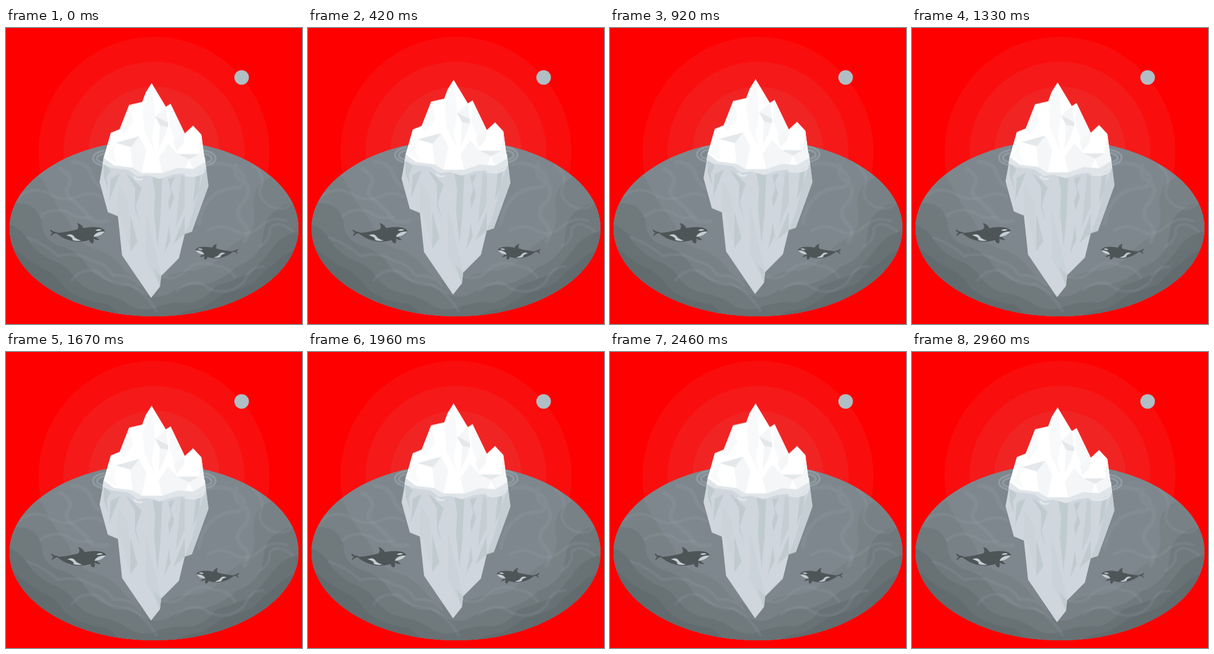
Write an HTML page that moves like this. It is 500 px wide and 500 px high and loops after 3 s.

```html
<!DOCTYPE html>
<html lang="en">
<head>
<meta charset="utf-8">
<title>Iceberg</title>
<style>
  html, body { margin: 0; width: 100%; height: 100%; overflow: hidden; background: #f00; }
  svg { display: block; width: 100vw; height: 100vh; }
  .berg { animation: float 1.5s linear -40ms infinite; }
  .whale { animation: shake 3s linear -40ms infinite; }
  .halo { fill: #b0bec5; opacity: .065; }
  .light { fill: none; stroke: #a9b4ba; stroke-linecap: round; stroke-linejoin: round; opacity: .13; }
  .ring { fill: none; stroke: #b4c0c7; opacity: .34; }
  .soft { fill: #f5f6f7; }
  .facet { fill: #e4e8eb; }
  .shade { fill: #c0cbd0; }
  @keyframes float {
    50% { transform: translateY(-10px); }
  }
  @keyframes shake {
    10%, 90% { transform: translateX(-1px); }
    20%, 80% { transform: translateX(2px); }
    30%, 50%, 70% { transform: translateX(-4px); }
    40%, 60% { transform: translateX(4px); }
  }
</style>
</head>
<body>
<svg viewBox="0 0 500 500">
  <defs>
    <clipPath id="sea"><ellipse cx="250" cy="338" rx="244" ry="149"/></clipPath>
    <g id="orca">
      <path fill="#4e5557" d="M75 340 Q78 343 82 344 Q85 344 88 346 Q103 345 121 340 Q124 335 120 329.500 Q128 331 131 338 Q145 335 158 337 Q166 339 167 343 Q166 348 157 351 L152 353 L158 358 Q152 359 148 355 Q149 361 147 364 Q141 363 141 358 Q133 361 120 361 Q101 359 88 349 Q85 346 83 347 Q79 348 76 352 Q75 348 79 346 Q74 344 75 340Z"/>
      <path fill="#c3ced4" d="M167 344 Q158 343 151 348 Q147 352 149 353 Q160 352 167 344ZM151 342 Q156 338 162 341 Q157 344 151 342ZM102 350 Q111 346 115 352 Q117 356 127 359 Q119 361 112 358 Q115 354 102 350Z"/>
      <path fill="#4e5557" d="M104 354 Q109 354 113 358 L108 357Z"/>
    </g>
    <g id="ripple">
      <path stroke-width="3.500" d="M167 207 C140 211 141 229 166 233"/>
      <path stroke-width="3.500" d="M168 212 C149 215 149 226 166 228"/>
    </g>
  </defs>

  <rect width="500" height="500" fill="#f00"/>
  <g>
    <circle class="halo" cx="250" cy="210" r="195"/>
    <circle class="halo" cx="250" cy="210" r="153"/>
    <circle class="halo" cx="250" cy="210" r="111"/>
  </g>
  <circle cx="398" cy="83.500" r="12.300" fill="#b0bec5"/>

  <g clip-path="url(#sea)">
    <rect y="180" width="500" height="320" fill="#7e878d"/>
    <path fill="#788286" d="M0 240 Q42 235 60 254 Q74 282 91 308 Q108 325 113 344 Q126 369 158 375 Q187 388 200 409 Q222 433 254 428 Q289 409 319 410 Q350 404 362 386 Q382 362 409 352 Q424 330 418 303 Q416 276 431 263 Q455 240 500 246 V500 H0Z"/>
    <path fill="#70797c" d="M0 298 Q34 291 49 306 Q61 319 61 338 Q67 359 88 367 Q119 375 134 397 Q151 424 183 430 Q214 436 231 448 Q257 461 280 446 Q303 431 333 434 Q370 424 388 404 Q419 393 432 367 Q435 341 440 325 Q453 301 500 289 V500 H0Z"/>
    <path fill="#687174" d="M0 330 Q24 336 38 360 Q55 383 79 393 Q106 403 116 422 Q134 445 165 449 Q194 456 211 470 Q235 481 259 470 Q287 461 314 464 Q343 455 354 436 Q384 426 412 415 Q432 396 447 376 Q464 348 500 342 V500 H0Z"/>
    <path fill="#626b6e" d="M278 492 Q302 475 328 474 Q351 462 368 449 Q394 443 418 431 Q438 409 455 397 Q473 377 500 372 V500 H278ZM0 360 Q26 385 54 402 Q82 413 98 438 Q125 462 170 466 Q187 476 194 492 H0Z"/>
    <g class="light" stroke-width="7">
      <path d="M92 238 Q115 251 106 266 Q96 278 111 290 T137 314 Q142 331 170 326"/>
      <path d="M113 226 Q138 228 144 247 Q151 269 173 275"/>
      <path d="M345 230 Q374 224 394 242 Q412 258 394 269 Q365 270 348 285 Q329 302 326 330"/>
      <path d="M389 231 Q382 252 403 260 Q418 279 397 299 Q384 316 402 331 Q414 344 403 361"/>
    </g>
    <g class="light" stroke-width="5">
      <path d="M22 285 Q45 266 71 279 Q95 294 119 286 Q143 274 161 285"/>
      <path d="M59 317 Q80 301 106 312 Q118 324 145 319"/>
      <path d="M36 354 Q67 365 88 385 Q122 377 146 394 Q169 397 181 418 Q211 416 226 434"/>
      <path d="M111 426 Q130 402 157 413 Q180 437 207 433 Q237 448 254 478"/>
      <path d="M267 421 Q289 426 303 410 Q326 389 353 402 Q374 402 387 421"/>
      <path d="M289 443 Q320 420 343 440 Q374 454 402 429 Q413 402 435 403"/>
      <path d="M341 342 Q363 329 386 342 Q407 355 430 335 Q450 317 474 326"/>
      <path d="M417 232 Q438 247 431 268 Q422 286 446 301 Q470 311 482 296"/>
      <path d="M429 369 Q448 357 445 339 Q457 322 484 343"/>
    </g>
  </g>

  <use class="whale" href="#orca"/>
  <g class="whale">
    <use href="#orca" transform="matrix(-.78 0 0 .78 450.3 107.5)"/>
  </g>

  <g class="berg">
    <g transform="translate(0 .5)">
      <g class="ring">
        <use href="#ripple"/>
        <use href="#ripple" transform="matrix(-1 0 0 1 501 0)"/>
      </g>
      <path fill="#cfd6dd" d="M166 216 L158 260 L172 311 L189 318 L196 384 L245 456 L260 437 L262 419 L292 389 L302 348 L314 344 L342 267 L336 218Z"/>
      <g class="shade">
        <path d="M165 229 L177 240 L170 252 L173 274 L165 251Z"/>
        <path d="M177 254 L192 246 L174 293Z"/>
        <path d="M203 246 L212 253 L229 270 L219 301 L226 328 L218 306 L218 270Z"/>
        <path d="M189 318 L194 318 L210 376 L222 360 L207 319 L206 293 L190 265Z" opacity=".28"/>
        <path d="M210 316 L222 361 L210 378Z"/>
        <path d="M247 250 L264 251 L261 320 L256 370 L250 312 L252 278Z"/>
        <path d="M236 310 L262 419 L260 437 L236 388Z" opacity=".35"/>
        <path d="M262 419 L260 437 L249 405Z"/>
        <path d="M274 255 L285 252 L278 269 L284 286 L276 310 L274 294 L279 278Z"/>
        <path d="M275 334 L278 358 L267 381 L272 355Z"/>
        <path d="M296 248 L302 253 L302 302 L287 336Z" opacity=".75"/>
        <path d="M302 316 L302 348 L283 364Z"/>
        <path d="M338 237 L328 263 L314 318 L302 348 L314 344 L342 267Z" opacity=".7"/>
        <path d="M321 248 L329 246 L325 276 L316 296Z"/>
      </g>
      <path fill="#e0e5e9" d="M165 217 L163 230 L177 236 L207 240 L222 251 L239 249 L260 255 L281 248 L297 246 L318 249 L338 238 L336 218Z"/>
      <path fill="none" stroke="#e3e8eb" stroke-width="3" d="M216 251 Q222 259 231 255M302 248 Q323 254 335 241"/>
      <path fill="#fff" d="M246 93 L270 133 L278 128 L302 178 L316 165 L330 180 L336 226 L316 238 L290 236 L264 245 L229 245 L214 236 L182 232 L165 219 L177 177 L192 171 L208 130 L230 125 L236 109Z"/>
      <g class="soft">
        <path d="M246 93 L252 150 L246 185 L251 208 L234 174 L231 139Z" opacity=".65"/>
        <path d="M252 150 L260 165 L258 204 L268 184 L274 165 L270 133Z"/>
        <path d="M278 128 L276 165 L286 190 L302 178Z" opacity=".65"/>
        <path d="M208 130 L215 159 L198 181 L192 171Z" opacity=".65"/>
        <path d="M210 201 L225 183 L237 207 L229 245 L214 236Z"/>
        <path d="M302 178 L283 191 L288 208 L300 195Z"/>
        <path d="M264 245 L258 219 L274 196 L290 213 L309 222 L303 237 L290 236Z"/>
        <path d="M330 180 L326 213 L309 222 L316 238 L336 226Z"/>
        <path d="M185 195 L182 214 L188 229 L168 218Z" opacity=".6"/>
      </g>
      <g class="facet">
        <path d="M185 194 L225 183 L211 201Z"/>
        <path d="M252 149 L274 160 L274 167 L261 165Z"/>
        <path d="M290 213 L326 213 L309 222Z"/>
      </g>
    </g>
  </g>
</svg>
</body>
</html>
```
